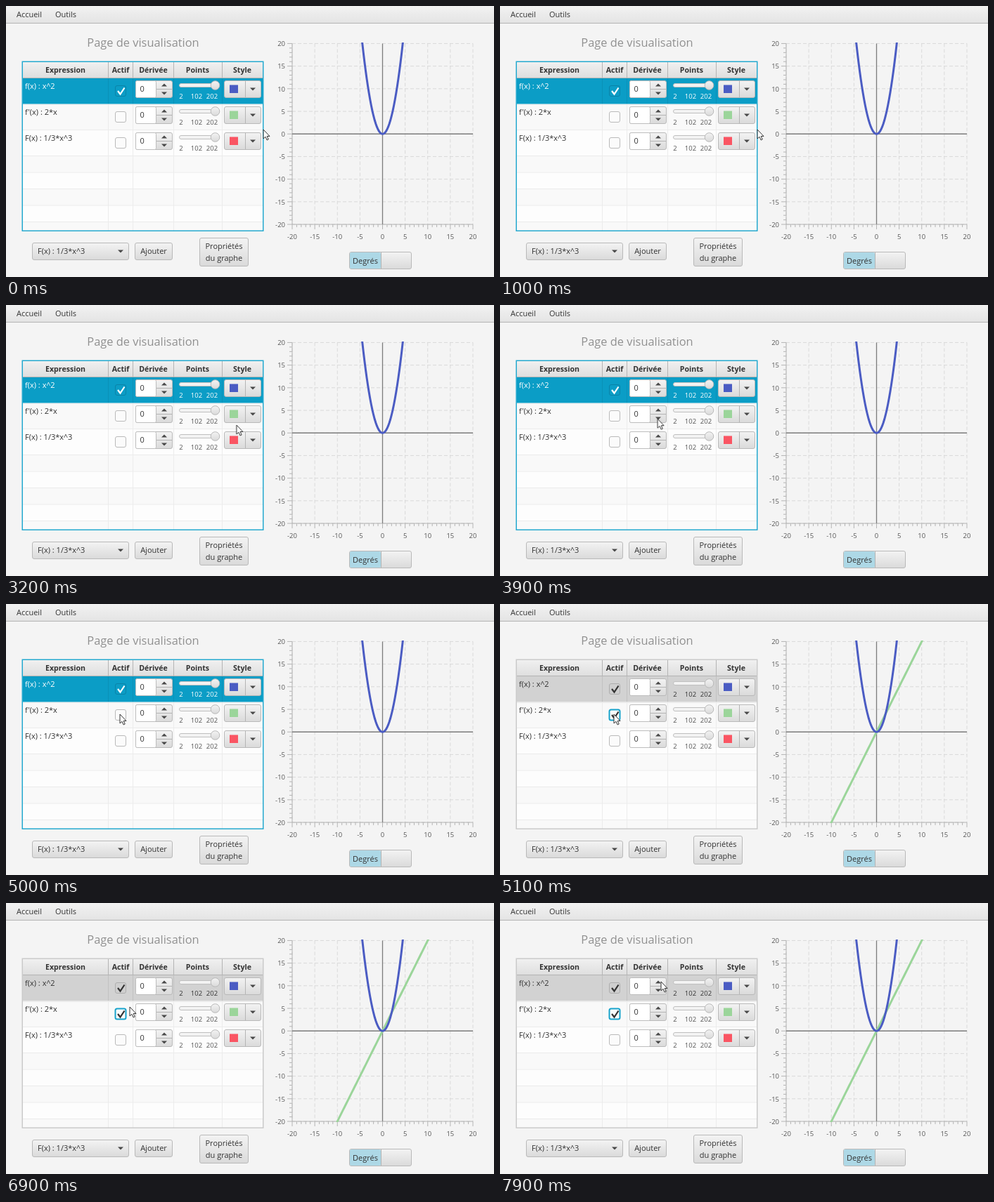
An HTML page for the animation above (8000 ms loop, 694 by 386 pixels).

```html
<!DOCTYPE html>
<html lang="fr">
<head>
<meta charset="utf-8">
<title>Page de visualisation</title>
<style>
html, body { margin: 0; width: 100%; height: 100%; overflow: hidden; background: #f4f4f4; }
svg { display: block; width: 694px; height: 386px; }
text { font: 11px "Open Sans", "Noto Sans", sans-serif; fill: #333; }
.title { font-size: 16.4px; fill: #909090; }
.head { font-size: 10.6px; font-weight: 700; }
.small { font-size: 9.5px; fill: #555; }
.mid { text-anchor: middle; }
.end { text-anchor: end; }
.btn { fill: url(#button); stroke: #b9b9b9; }
.field { fill: #fff; stroke: #bdbdbd; }
.box { fill: #fbfbfb; stroke: #bababa; }
.arrow { fill: #484848; }
.grid { stroke: #d9d9d9; stroke-dasharray: 5 3; }
.axis { stroke: #b4b4b4; }
.zero { stroke: #7c7c7c; stroke-width: 1.3; }
.curve { fill: none; stroke-width: 3; }
.tick { fill: none; stroke: #333; stroke-width: 2.2; }

.selRow, .selText, .selBox, .selTick, .frame, .after { animation: 8s step-end infinite; }
.selRow { animation-name: row; }
.selText { animation-name: label; }
.selBox { animation-name: box; }
.selTick { animation-name: tick; }
.frame { animation-name: frame; fill: none; stroke-width: 1.5; }
.after { animation-name: show; }
.cursor { animation: move 8s linear infinite; }
@keyframes row { 0% { fill: #0b9dc6; } 63.75%, 100% { fill: #d2d2d2; } }
@keyframes label { 0% { fill: #fff; } 63.75%, 100% { fill: #333; } }
@keyframes box { 0% { fill: #0b9dc6; stroke: #0a83a8; } 63.75%, 100% { fill: #cfcfcf; stroke: #aeaeae; } }
@keyframes tick { 0% { stroke: #fff; } 63.75%, 100% { stroke: #333; } }
@keyframes frame { 0% { stroke: #25a9cf; } 63.75%, 100% { stroke: #cacaca; } }
@keyframes show { 0% { opacity: 0; } 63.75%, 100% { opacity: 1; } }
@keyframes move {
  0%, 33.75% { transform: translate(366px, 176px); }
  40% { transform: translate(328px, 171px); }
  54%, 79% { transform: translate(162px, 157px); }
  86.25%, 90% { transform: translate(176px, 148px); }
  98%, 100% { transform: translate(229px, 112px); }
}
</style>
</head>
<body>
<svg id="stage" viewBox="0 0 694 386" xmlns="http://www.w3.org/2000/svg"></svg>
<script>
const rect = (x, y, w, h, attrs = '') => `<rect x="${x}" y="${y}" width="${w}" height="${h}" ${attrs}/>`;
const line = (x1, y1, x2, y2, cls) => `<path class="${cls}" d="M${x1} ${y1}L${x2} ${y2}"/>`;
const text = (x, y, s, cls = '') => `<text x="${x}" y="${y}" class="${cls}">${s}</text>`;
const button = (x, y, w, h) => rect(x + .5, y + .5, w, h, 'rx="2.5" class="btn"');
const arrow = (x, y, dir = 1) =>
  `<path class="arrow" d="M${x - 4} ${y - 2 * dir}h8l-4 ${4 * dir}z"/>`;
const gradient = (id, from, to) => `<linearGradient id="${id}" x2="0" y2="1">
  <stop stop-color="${from}"/><stop offset="1" stop-color="${to}"/></linearGradient>`;
const range = (from, to, step) =>
  Array.from({ length: (to - from) / step + 1 }, (_, i) => from + i * step);

const BLUE = '#4b5cc3', GREEN = '#9bd59a', RED = '#fa5563';
const COLUMNS = [145.5, 180.5, 238.5, 307.5];
const ROW = 37;

function checkbox(y, boxCls, tickCls) {
  const tick = tickCls ? `<path class="tick ${tickCls}" d="M159 ${y + 8}l3.5 4.5 6-9"/>` : '';
  return rect(155.5, y + .5, 15, 15, `rx="2.5" class="${boxCls}"`) + tick;
}

function tableRow(label, color, i) {
  const y = 103 + i * ROW, sel = i === 0 ? ' selText' : '';
  const check = i === 0 ? checkbox(113, 'selBox', 'selTick') : checkbox(113 + i * ROW, 'box');
  return text(27, y + 15, label, sel) + check
    + button(184, y + 3, 52, 24)
    + rect(184.5, y + 3.5, 29, 24, 'rx="2" class="field"') + text(190.5, y + 19, '0')
    + line(214, y + 15.5, 236, y + 15.5, 'axis')
    + arrow(225, y + 9.5, -1) + arrow(225, y + 21.5)
    + rect(246.5, y + 7.5, 54, 5, 'rx="2.5" fill="#f3f3f3" stroke="#bfbfbf"')
    + `<circle cx="297.5" cy="${y + 10}" r="6.3" class="btn"/>`
    + [[249, 2], [271, 102], [293, 202]].map(([x, s]) => text(x, y + 28.5, s, 'small mid' + sel)).join('')
    + button(310, y + 3, 52, 24)
    + rect(318, y + 9.5, 12, 11.5, `fill="${color}"`)
    + line(340.5, y + 4, 340.5, y + 27, 'axis') + arrow(351, y + 15.5);
}

function table() {
  const rowLines = [140.5, 176.5, ...range(213.5, 307.5, 23.5)];
  const heads = [[84.5, 'Expression'], [163, 'Actif'], [209.5, 'Dérivée'], [272.5, 'Points'], [336, 'Style']];
  return rect(23, 79, 343, 241, 'fill="#fdfdfd"')
    + [140, 213, 260.5, 307.5].map((y, i) =>
        rect(23, y, 343, [37, 23.5, 23.5, 12.5][i], 'fill="#f9f9f9"')).join('')
    + rowLines.map(y => line(23, y, 366, y, 'rowLine')).join('')
    + COLUMNS.map(x => line(x, 103, x, 320, 'rowLine')).join('')
    + rect(23, 103, 343, 36.5, 'class="selRow"')
    + COLUMNS.map(x => `<path d="M${x} 103V139" stroke="#000" opacity=".07"/>`).join('')
    + rect(23, 79, 343, 24, 'fill="url(#header)"')
    + COLUMNS.map(x => line(x, 79, x, 103, 'axis')).join('')
    + line(23, 102.5, 366, 102.5, 'axis')
    + heads.map(([x, s]) => text(x, 95, s, 'head mid')).join('')
    + [['f(x) : x^2', BLUE], ["f'(x) : 2*x", GREEN], ['F(x) : 1/3*x^3', RED]]
        .map(([s, c], i) => tableRow(s, c, i)).join('')
    + `<g class="after">${checkbox(150, 'focus', 'dark')}</g>`
    + rect(23.25, 79.25, 342.5, 241, 'class="frame"');
}

function chart() {
  const px = x => 535.5 + x * 6.425, py = y => 182.25 - y * 6.44;
  const top = py(20), bottom = py(-20), left = px(-20), right = px(20);
  const plot = (f, color, cls = '') => `<path class="curve ${cls}" stroke="${color}" clip-path="url(#area)" d="M`
    + range(-10.5, 10.5, .25).map(x => `${px(x)} ${py(f(x)).toFixed(2)}`).join('L') + '"/>';
  const major = range(-20, 20, 5);
  return `<clipPath id="area">${rect(left, top - .5, right - left, bottom - top + 1)}</clipPath>`
    + major.map(v => line(px(v), top, px(v), bottom, 'grid') + line(left, py(v), right, py(v), 'grid')).join('')
    + line(left, top, left, bottom, 'axis') + line(left, bottom, right, bottom, 'axis')
    + range(-20, 20, 1).map(v => {
        const n = v % 5 ? 4 : 7;
        return line(px(v), bottom, px(v), bottom + n, 'axis') + line(left - n, py(v), left, py(v), 'axis');
      }).join('')
    + major.map(v => text(px(v), 332, v, 'small mid') + text(397, py(v) + 3.7, v, 'small end')).join('')
    + line(px(0), top, px(0), bottom, 'zero') + line(left, py(0), right, py(0), 'zero')
    + plot(x => 2 * x, GREEN, 'after') + plot(x => x * x, BLUE);
}

const controls = button(37, 337, 137, 24) + text(45, 353, 'F(x) : 1/3*x^3') + arrow(163, 349.5)
  + button(183, 337, 53, 24) + text(210, 353, 'Ajouter', 'mid')
  + button(275, 330, 69, 40) + text(310, 346, 'Propriétés', 'mid') + text(310, 363, 'du graphe', 'mid')
  + button(488, 350, 88, 24) + rect(489, 351, 44, 23, 'rx="2" fill="#add8e6"')
  + line(533.5, 351, 533.5, 374, 'axis') + text(511, 366.5, 'Degrés', 'mid');

document.getElementById('stage').innerHTML =
  `<defs>${gradient('button', '#f3f3f3', '#dadada')}${gradient('header', '#f1f1f1', '#dedede')}
   ${gradient('menu', '#f2f2f2', '#e4e4e4')}
   <style>.rowLine { stroke: #ececec; } .focus { fill: #fbfbfb; stroke: #18a3cc; stroke-width: 2; }</style></defs>`
  + rect(0, 0, 694, 24, 'fill="url(#menu)"') + line(0, 24.5, 694, 24.5, 'axis')
  + text(15, 16, 'Accueil') + text(70, 16, 'Outils')
  + text(195, 58, 'Page de visualisation', 'title mid')
  + table() + chart() + controls
  + `<path class="cursor" d="M0 0V13L3 10.3 5.2 15 7.2 14 5.2 9.5H9Z" fill="#fff" stroke="#333" stroke-linejoin="round"/>`;
</script>
</body>
</html>
```
